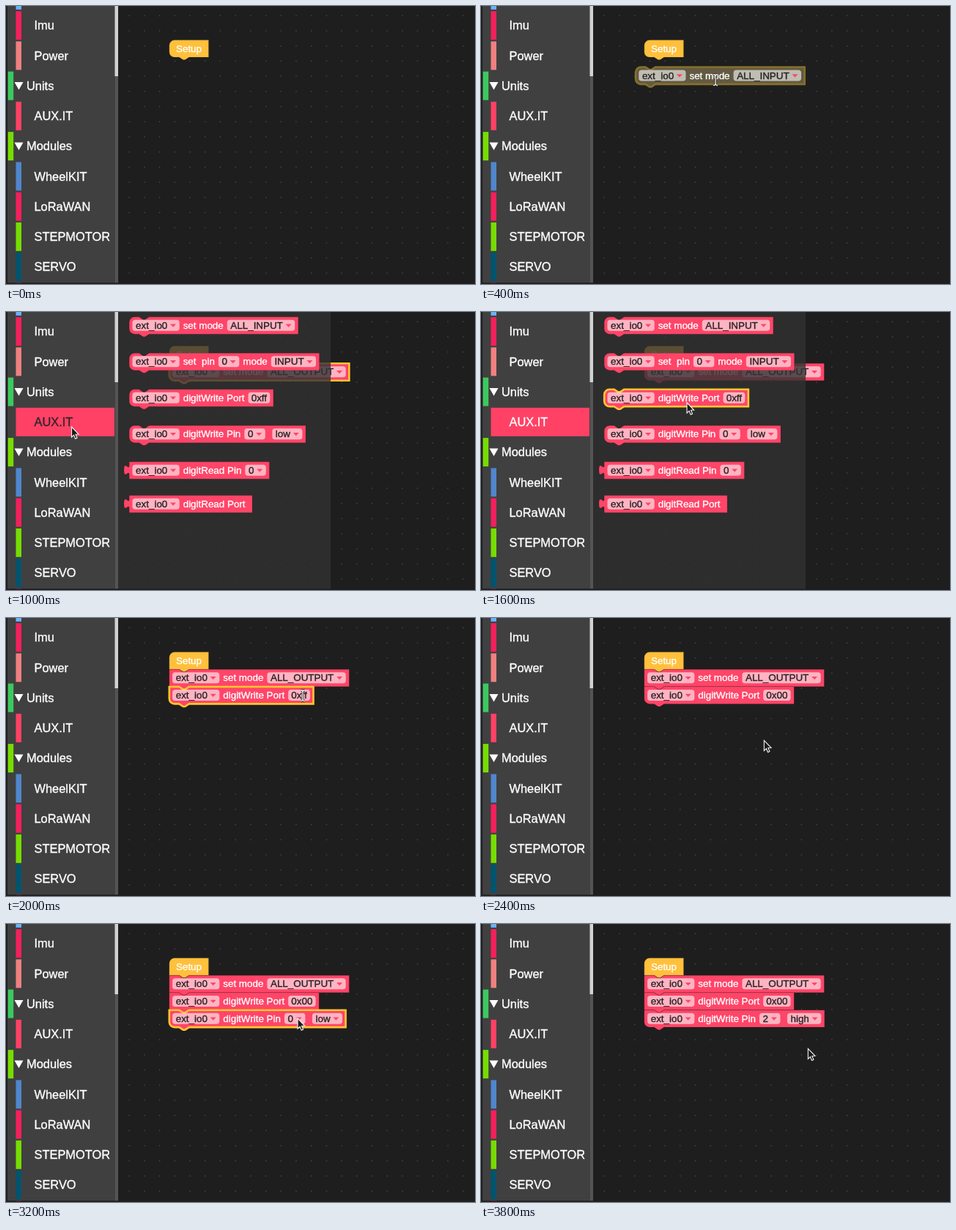
An HTML page with a canvas that plays this animation: 640 px wide and 380 px high, repeating every 4 s.

```html
<!DOCTYPE html>
<html lang="en">
<head>
<meta charset="utf-8">
<title>Block editor</title>
<style>
  html, body { margin: 0; width: 640px; height: 380px; overflow: hidden; background: #1e1e1e; }
  canvas { display: block; }
</style>
</head>
<body>
<canvas id="stage" width="640" height="380"></canvas>
<script>
const ctx = document.getElementById('stage').getContext('2d');
const FAMILY = '"Liberation Sans", Arial, sans-serif';
const PINK = '#ff4568', YELLOW = '#ffc03c', SELECT = '#ffc72c';
const STACK_X = 222.8, STACK_Y = 46.6, ROW = 23.7, BODY = 23.4, RADIUS = 7.2;

// Categories: name, bar colour, whether it is a group heading
const categories = [
  ['', '#66b5ff'],
  ['Imu', '#f4205c'],
  ['Power', '#f08080'],
  ['Units', '#3cc95e', true],
  ['AUX.IT', '#ff4165'],
  ['Modules', '#76dd00', true],
  ['WheelKIT', '#5086cc'],
  ['LoRaWAN', '#f4205c'],
  ['STEPMOTOR', '#76dd00'],
  ['SERVO', '#00546f'],
  ['', '#f4205c'],
];

// Block parts: "<" starts a dropdown, "[" an input, anything else is a label
const setMode = mode => ['<ext_io0', 'set mode', '<' + mode];
const writePort = value => ['<ext_io0', 'digitWrite Port', '[' + value];
const writePin = (pin, level) => ['<ext_io0', 'digitWrite Pin', '<' + pin, '<' + level];

const palette = [
  { y: 6.8, parts: setMode('ALL_INPUT') },
  { y: 56.3, parts: ['<ext_io0', 'set\u00a0 pin', '<0', 'mode', '<INPUT'] },
  { y: 105.8, parts: writePort('0xff') },
  { y: 155.3, parts: writePin(0, 'low') },
  { y: 204.8, parts: ['<ext_io0', 'digitRead Pin', '<0'], output: true },
  { y: 250.8, parts: ['<ext_io0', 'digitRead Port'], output: true },
];

const modeIn = setMode('ALL_INPUT'), modeOut = setMode('ALL_OUTPUT');
const portFF = writePort('0xff'), port00 = writePort('0x00');

// One entry per 200 ms. pick: selected palette block, sel: selected stack block
const steps = [
  { stack: [] },
  { stack: [], flyout: true, pick: 0, arrow: [277, 25] },
  { stack: [], drag: [211, 83.5, modeIn], beam: [320, 101] },
  { stack: [modeIn], sel: 0, arrow: [440, 82] },
  { stack: [modeOut], sel: 0, arrow: [330, 112] },
  { stack: [modeOut], sel: 0, flyout: true, hover: true, arrow: [89.5, 157] },
  { stack: [modeOut], sel: 0, flyout: true, arrow: [217, 117] },
  { stack: [modeOut], sel: 0, flyout: true, beam: [401, 68] },
  { stack: [modeOut], flyout: true, pick: 2, arrow: [281, 124] },
  { stack: [modeOut, portFF], sel: 1, arrow: [336, 112] },
  { stack: [modeOut, portFF], sel: 1, beam: [405, 106] },
  { stack: [modeOut, port00], sel: 1, beam: [412, 106] },
  { stack: [modeOut, port00], arrow: [386.3, 167.3] },
  { stack: [modeOut, port00], flyout: true, pick: 3, arrow: [233, 167] },
  { stack: [modeOut, port00], drag: [201, 167.2, writePin(0, 'low')], arrow: [265.5, 179] },
  { stack: [modeOut, port00, writePin(0, 'low')], sel: 2, arrow: [288, 130] },
  { stack: [modeOut, port00, writePin(0, 'low')], sel: 2, arrow: [398, 129] },
  { stack: [modeOut, port00, writePin(2, 'low')], sel: 2, arrow: [400, 140] },
  { stack: [modeOut, port00, writePin(2, 'high')], sel: 2, arrow: [450, 131] },
  { stack: [modeOut, port00, writePin(2, 'high')], arrow: [446.3, 170.3] },
];

function rect(x, y, w, h, fill) {
  ctx.fillStyle = fill;
  ctx.fillRect(x, y, w, h);
}

// A thin stroke gives the letters a slightly heavier weight
function text(str, x, y, color) {
  ctx.fillStyle = ctx.strokeStyle = color;
  ctx.lineWidth = 0.35;
  ctx.fillText(str, x, y);
  ctx.strokeText(str, x, y);
}

function polygon(points, fill) {
  ctx.beginPath();
  points.forEach(p => ctx.lineTo(...p));
  ctx.closePath();
  ctx.fillStyle = fill;
  ctx.fill();
}

const isField = part => /^[<[]/.test(part);

// Places the parts from left to right and returns the block width too
function layout(parts) {
  let x = isField(parts[0]) ? 4.3 : 9.2, wasField = false;
  const items = parts.map((part, i) => {
    const field = isField(part), menu = part[0] === '<';
    const label = field ? part.slice(1) : part;
    const w = ctx.measureText(label).width + (menu ? 21 : field ? 8.4 : 0);
    if (i) x += field && wasField ? 9.5 : 5;
    const item = { label, field, menu, x, w };
    x += w;
    wasField = field;
    return item;
  });
  return { items, width: x + (wasField ? 4.6 : 9.5) };
}

function outline(x, y, w, { hat, output, above, below }) {
  const bottom = y + BODY, left = x + 13.5;
  const topR = above || output ? 0 : RADIUS, bottomR = below || output ? 0 : RADIUS;
  ctx.beginPath();
  ctx.moveTo(x, y + topR);
  ctx.arcTo(x, y, x + topR, y, topR);
  if (!hat && !output) {
    ctx.lineTo(left, y);
    ctx.lineTo(left + 5.4, y + 3.6);
    ctx.lineTo(left + 8.1, y + 3.6);
    ctx.lineTo(left + 13.5, y);
  }
  ctx.lineTo(x + w, y);
  ctx.lineTo(x + w, bottom);
  if (!output) {
    ctx.lineTo(left + 13.5, bottom);
    ctx.lineTo(left + 8.1, bottom + 3.6);
    ctx.lineTo(left + 5.4, bottom + 3.6);
    ctx.lineTo(left, bottom);
  }
  ctx.lineTo(x + bottomR, bottom);
  ctx.arcTo(x, bottom, x, bottom - bottomR, bottomR);
  if (output) {
    ctx.lineTo(x, y + 18);
    ctx.bezierCurveTo(x, y + 9, x - 7.2, y + 25.2, x - 7.2, y + 11.25);
    ctx.bezierCurveTo(x - 7.2, y - 2.7, x, y + 13.5, x, y + 4.5);
  }
  ctx.closePath();
}

function block(x, y, parts, opts = {}) {
  ctx.font = '13.4px ' + FAMILY;
  const { items, width } = layout(parts);
  outline(x, y, width, opts);
  ctx.fillStyle = opts.color || PINK;
  ctx.fill();
  ctx.strokeStyle = opts.border || 'rgba(0,0,0,.15)';
  ctx.lineWidth = opts.border ? 2.6 : 0.8;
  ctx.stroke();
  const mid = y + 11.6;
  for (const { label, field, menu, x: dx, w } of items) {
    if (field) {
      ctx.beginPath();
      ctx.roundRect(x + dx, mid - 7.6, w, 15, 3.8);
      ctx.fillStyle = 'rgba(255,255,255,.6)';
      ctx.fill();
    }
    text(label, x + dx + (menu ? 4.6 : field ? 4.2 : 0), mid + 4.4, field ? '#262224' : '#fff');
    if (menu) {
      const ax = x + dx + w - 12.6;
      polygon([[ax, mid - 1.8], [ax + 8, mid - 1.8], [ax + 4, mid + 2.4]], PINK);
    }
  }
}

function sidebar({ flyout, hover }) {
  rect(2, 0, 146.5, 378.5, '#404040');
  rect(148.5, 0, 4.5, 378.5, '#545454');
  rect(148.5, 0, 4.5, 96, '#d2d2d2');
  ctx.font = '16.4px ' + FAMILY;
  categories.forEach(([name, color, heading], i) => {
    const mid = 26.6 + (i - 1) * 41.25;
    const open = flyout && i === 4;
    rect(heading ? 2.7 : 13.5, mid - 19.5, open ? 134.5 : 7.5, 39, color);
    if (heading) polygon([[11.5, mid - 5], [23.5, mid - 5], [17.5, mid + 5.5]], '#fff');
    text(name, heading ? 28 : 38.5, mid + 5.8, open && hover ? '#33242a' : '#fff');
  });
  rect(0, 378.5, 153, 1.5, '#1e1e1e');
}

function arrow(x, y) {
  ctx.save();
  ctx.translate(x, y);
  ctx.scale(0.92, 0.98);
  polygon([[0, 0], [0, 14.5], [3.3, 11.4], [5.6, 16.6], [8.2, 15.5], [6, 10.4], [10.4, 10.2]], '#1a1a1a');
  ctx.strokeStyle = '#f2f2f2';
  ctx.lineWidth = 1.2;
  ctx.stroke();
  ctx.restore();
}

function beam(x, y) {
  ctx.beginPath();
  for (const s of [-1, 1]) {
    ctx.moveTo(x - 3, y + 7.5 * s);
    ctx.quadraticCurveTo(x, y + 7.5 * s, x, y + 5 * s);
    ctx.quadraticCurveTo(x, y + 7.5 * s, x + 3, y + 7.5 * s);
  }
  ctx.moveTo(x, y - 6);
  ctx.lineTo(x, y + 6);
  for (const [color, width] of [['#222', 2.8], ['#f4f4f4', 1.3]]) {
    ctx.strokeStyle = color;
    ctx.lineWidth = width;
    ctx.stroke();
  }
}

function draw(step) {
  const { stack, sel, flyout, pick, drag } = step;
  rect(0, 0, 640, 380, '#1e1e1e');
  for (let x = 167.6; x < 640; x += 20.7)
    for (let y = 12.6; y < 380; y += 20.7) rect(x, y, 1.3, 1.3, '#505050');

  block(STACK_X, STACK_Y, ['Setup'], { color: YELLOW, hat: true, below: stack.length > 0 });
  stack.forEach((parts, i) => block(STACK_X, STACK_Y + ROW * (i + 1), parts, {
    above: true, below: i < stack.length - 1, border: i === sel && SELECT,
  }));

  if (flyout) {
    rect(153, 0, 290, 378.5, 'rgba(49,49,49,.8)');
    palette.forEach(({ y, parts, output }, i) =>
      block(168.2, y, parts, { output, border: i === pick && SELECT }));
  }
  sidebar(step);
  if (drag) block(...drag, { color: '#625a42', border: '#86702c' });
  if (step.arrow) arrow(...step.arrow);
  if (step.beam) beam(...step.beam);
}

function tick() {
  draw(steps[Math.floor(performance.now() % 4000 / 200)]);
  requestAnimationFrame(tick);
}
tick();
</script>
</body>
</html>
```
